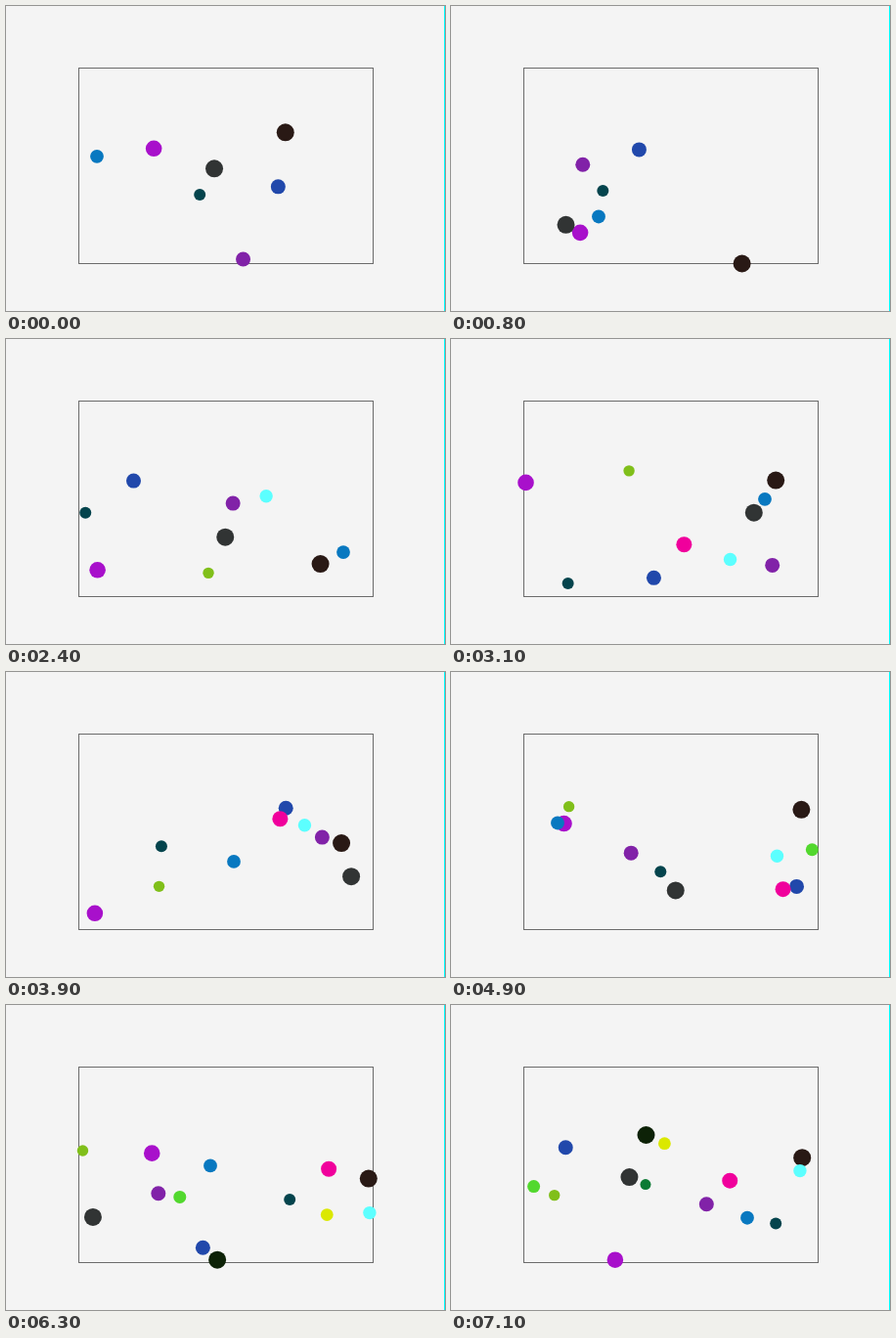
An HTML page with a canvas that plays this animation: 449x312 px, repeating every 7.2 s.

```html
<!DOCTYPE html>
<html lang="en">
<head>
<meta charset="utf-8">
<title>Bouncing balls</title>
<style>
  html, body { margin: 0; width: 100%; height: 100%; overflow: hidden; background: #f4f4f4; }
  canvas { display: block; }
</style>
</head>
<body>
<canvas id="stage" width="449" height="312"></canvas>
<script>
const ctx = document.getElementById('stage').getContext('2d');

const LOOP = 7200, STEP = 100;
const LEFT = 75, RIGHT = 375, FLOOR = 263.5;
const START = { x: 225, y: 163.5 };
const GRAVITY = 0.1;
const FIRST = -366, EVERY = 60; // spawn times in ticks

// One ball per spawn: colour, radius, vx, vy
const balls = [
  ['#04444d', 6, 0.893, 0.58],
  ['#2148ab', 7.5, -1.79, -2.76],
  ['#291915', 9, 0.247, -2.955],
  ['#a810cb', 8.3, -0.397, 2.22],
  ['#8122a8', 7.5, 2.245, 1.335],
  ['#0878c0', 6.9, -2, 1.965],
  ['#313434', 9, -1.99, 0.12],
  ['#5cffff', 6.7, 0.452, 1.785],
  ['#80bf1a', 5.7, -0.58, 2.53],
  ['#f0009c', 8, 0.955, 2.59],
  ['#52d82e', 6.5, 2.405, 1.07],
  ['#dbe800', 6.4, 2.337, -2.35],
  ['#0d2207', 9, -0.354, 2.587],
  ['#0b7a33', 5.5, -2.17, 1.02]
];

// Uneven pace of the simulation: [step, tick]
const pace = [[0, 0], [1, 1], [2, 12], [8, 48], [16, 97], [24, 145], [37, 224],
              [39, 232], [49, 294], [56, 337], [71, 426]];

function tickAt(step) {
  const i = Math.max(1, pace.findIndex(p => p[0] >= step));
  const [s0, t0] = pace[i - 1], [s1, t1] = pace[i];
  return Math.round(t0 + (t1 - t0) * (step - s0) / (s1 - s0));
}

function position(age, vx, vy) {
  let { x, y } = START;
  while (age-- > 0) {
    vy += GRAVITY;
    x += vx;
    y += vy;
    if (x < LEFT || x > RIGHT) {
      x = x < LEFT ? LEFT : RIGHT;
      vx = -vx;
    }
    if (y > FLOOR) {
      y = FLOOR;
      vy = -vy;
    }
  }
  return [x, y];
}

function draw(step) {
  const tick = tickAt(step);
  ctx.fillStyle = '#f4f4f4';
  ctx.fillRect(0, 0, 449, 312);
  ctx.fillStyle = '#00ffff';
  ctx.fillRect(448, 0, 1, 312);
  ctx.strokeStyle = '#6b6b6b';
  ctx.strokeRect(74.5, 63.5, 301, 200);

  balls.forEach(([color, r, vx, vy], i) => {
    const age = tick - FIRST - i * EVERY;
    if (age <= 0) return;
    const [x, y] = position(age, vx, vy);
    ctx.fillStyle = color;
    ctx.beginPath();
    ctx.arc(x, y, r, 0, Math.PI * 2);
    ctx.fill();
  });
}

const t0 = performance.now();
let shown = -1;

function loop() {
  const step = Math.floor((performance.now() - t0) % LOOP / STEP);
  if (step !== shown) draw(shown = step);
  requestAnimationFrame(loop);
}
loop();
</script>
</body>
</html>
```
